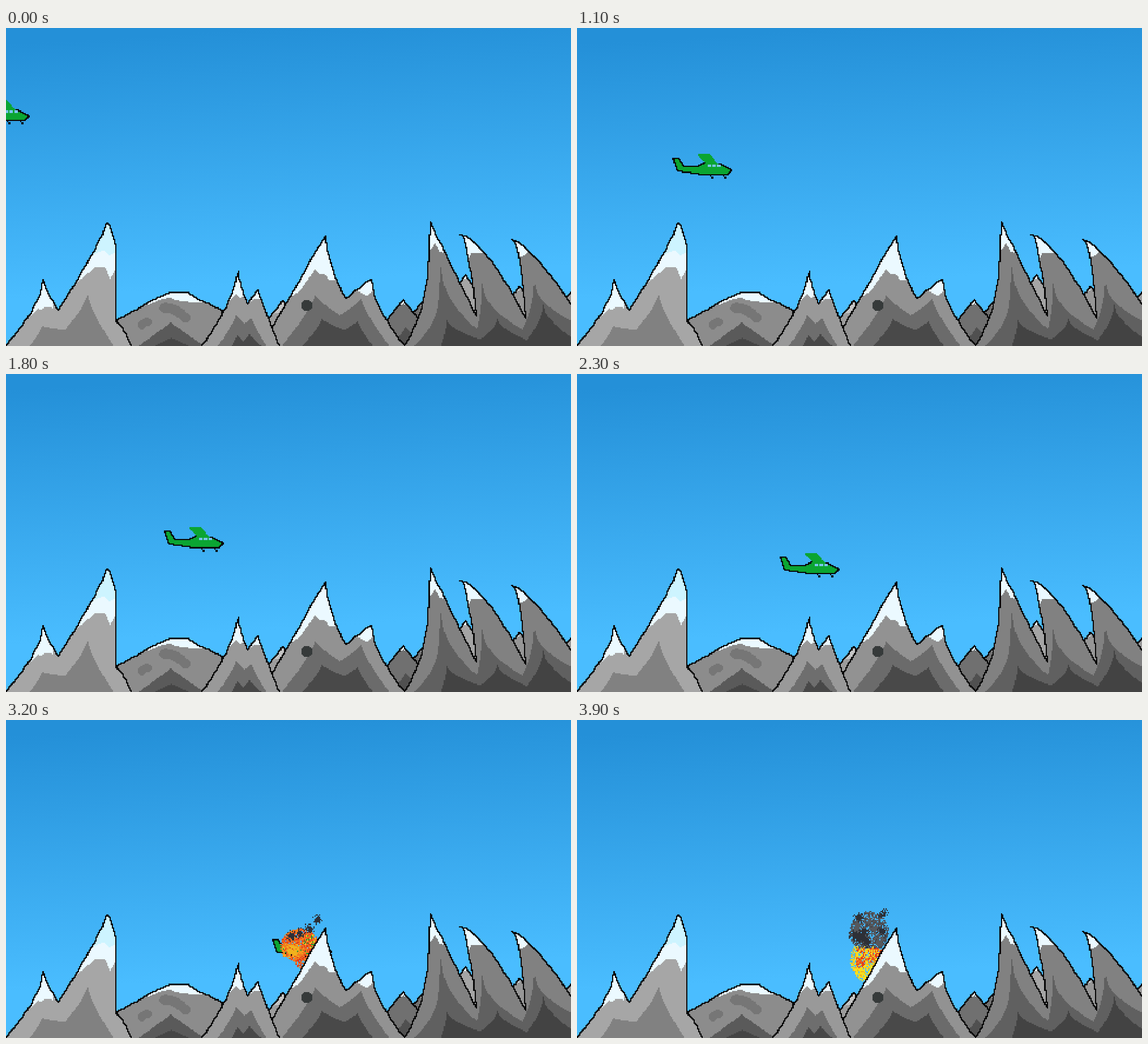
An HTML page with a canvas that plays this animation: 998x561 px, repeating every 4000 ms.

```html
<!DOCTYPE html>
<html lang="en">
<head>
<meta charset="utf-8">
<title>Mountain flight</title>
<style>
html, body { margin: 0; width: 100%; height: 100%; overflow: hidden; background: #48b9fb; }
canvas { display: block; width: 998px; height: 561px; }
</style>
</head>
<body>
<canvas id="stage" width="998" height="561"></canvas>
<script>
// Shapes are given in stage pixels and rasterised onto a coarse 480 x 270 grid.
const COLS = 480, ROWS = 270, CELL = 998 / COLS;
const INK = '#080808', SNOW = '#ebf9ff', ICE = '#cdf4ff', GREEN = '#0ba532';
const RED = '#e23e1c', ORANGE = '#f07a1f', AMBER = '#f0b21d', YELLOW = '#f6df20';
const SOOT = '#2d3037', SMOKE = '#55585d', ASH = '#42454b';
const FLOOR = 580, CEILING = 300;

function grid(w = COLS, h = ROWS) {
  const canvas = document.createElement('canvas');
  canvas.width = w;
  canvas.height = h;
  return canvas.getContext('2d');
}

const toCells = points => points.map(([x, y]) => [x / CELL, y / CELL]);

function fillShape(g, points, color) {
  const cells = toCells(points);
  g.fillStyle = color;
  for (let row = 0; row < g.canvas.height; row++) {
    const y = row + 0.5, hits = [];
    cells.forEach(([x1, y1], i) => {
      const [x2, y2] = cells[(i + 1) % cells.length];
      if ((y1 <= y) !== (y2 <= y)) hits.push(x1 + (y - y1) / (y2 - y1) * (x2 - x1));
    });
    hits.sort((a, b) => a - b);
    for (let i = 0; i + 1 < hits.length; i += 2) {
      const left = Math.round(hits[i]);
      g.fillRect(left, row, Math.round(hits[i + 1]) - left, 1);
    }
  }
}

// Steps move along one axis at a time, so diagonals have no gaps at the corners.
function strokeShape(g, points) {
  const cells = toCells(points).map(p => p.map(Math.floor));
  g.fillStyle = INK;
  for (let i = 1; i < cells.length; i++) {
    let [x, y] = cells[i - 1];
    const [x2, y2] = cells[i];
    const dx = Math.abs(x2 - x), dy = Math.abs(y2 - y);
    const sx = Math.sign(x2 - x), sy = Math.sign(y2 - y);
    g.fillRect(x, y, 1, 1);
    for (let a = 0, b = 0; a < dx || b < dy;) {
      if (b >= dy || (a < dx && (a + 0.5) * dy < (b + 0.5) * dx)) { x += sx; a++; }
      else { y += sy; b++; }
      g.fillRect(x, y, 1, 1);
    }
  }
}

// Joins peaks and valleys [x, y, bend]; a bend below 1 makes the slope steepest at the top.
function ridge(keys, defaultBend = 1) {
  const points = [];
  for (let i = 0; i + 1 < keys.length; i++) {
    const [x1, y1, bend = defaultBend] = keys[i], [x2, y2] = keys[i + 1];
    for (let k = 0; k < 12; k++) {
      const t = k / 12;
      const drop = y1 < y2 ? t ** bend : 1 - (1 - t) ** bend;
      points.push([x1 + (x2 - x1) * t, y1 + (y2 - y1) * drop]);
    }
  }
  points.push(keys[keys.length - 1].slice(0, 2));
  return points;
}

const closeAt = (line, y) => [...line, [line[line.length - 1][0], y], [line[0][0], y]];
const shade = (color, keys, bend) => [color, closeAt(ridge(keys, bend), FLOOR)];
const cap = (color, ...keys) => [color, closeAt(ridge(keys), CEILING)];

function ellipse(cx, cy, rx, ry = rx) {
  return Array.from({ length: 20 }, (_, i) => {
    const a = i * Math.PI / 10;
    return [cx + rx * Math.cos(a), cy + ry * Math.sin(a)];
  });
}

// Patches stay inside the silhouette below the ridge line.
function mountain(target, line, color, patches) {
  const g = grid();
  fillShape(g, closeAt(line, FLOOR), color);
  g.globalCompositeOperation = 'source-atop';
  for (const [tone, points] of patches) fillShape(g, points, tone);
  g.globalCompositeOperation = 'source-over';
  strokeShape(g, line);
  target.drawImage(g.canvas, 0, 0);
}

// A small far peak with a light cap.
function farPeak(g, x, y, reach, color, capColor, depth) {
  const line = ridge([[x - reach, y + reach * 1.2], [x, y], [x + reach, y + reach * 1.2]], 0.9);
  mountain(g, line, color, [cap(capColor, [x - reach, y + depth], [x, y + depth * 0.7], [x + reach, y + depth])]);
}

function makeBackdrop() {
  const g = grid();
  const sky = g.createLinearGradient(COLS / 2 - 8, 0, COLS / 2 + 8, ROWS);
  sky.addColorStop(0, '#2490d8');
  sky.addColorStop(0.8, '#4abdff');
  g.fillStyle = sky;
  g.fillRect(0, 0, COLS, ROWS);

  const blots = [ellipse(240, 524, 8), ellipse(249, 519, 9, 7)];
  for (let i = 0; i < 5; i++) blots.push(ellipse(281 + i * 9, 494 + i * i * 1.1, 10, 9));
  mountain(g, ridge([[190, 520], [258, 481], [292, 466], [322, 466], [335, 476], [400, 507]]), '#8c8c8c', [
    cap(SNOW, [250, 489], [275, 479], [289, 476], [303, 481], [334, 485], [356, 485]),
    ...blots.map(blot => ['#767676', blot]),
    shade('#5a5a5a', [[228, 566], [291, 520], [356, 566]]),
    shade('#454545', [[252, 566], [292, 547], [335, 566]])
  ]);
  farPeak(g, 489, 482, 30, '#9c9c9c', '#c5c5c5', 26);
  farPeak(g, 735, 484, 22, '#707070', '#bcbcbc', 9);
  farPeak(g, 702, 479, 34, '#707070', SNOW, 12);
  fillShape(g, closeAt(ridge([[680, 566], [706, 528], [740, 566]]), FLOOR), '#505050');
  farPeak(g, 812, 436, 25, '#a5a5a5', SNOW, 10);
  farPeak(g, 908, 456, 18, '#969696', SNOW, 9);
  farPeak(g, 1002, 461, 22, '#9b9b9b', SNOW, 6);
  return g.canvas;
}

function makeForeground() {
  const g = grid();
  mountain(g, ridge([[460, 547], [564, 366, 0.62], [600, 478], [645, 443, 0.62], [704, 561]]), '#929292', [
    cap(SNOW, [503, 475], [520, 463], [546, 426], [555, 435], [563, 434], [570, 444], [584, 444]),
    cap(SNOW, [619, 463], [638, 473], [650, 462]),
    shade('#6b6b6b', [[483, 566], [546, 472], [590, 507], [627, 478], [681, 566]], 0.8),
    shade('#494949', [[519, 566], [558, 514], [598, 533], [621, 517], [652, 566]], 0.8),
    ['#363a3a', ellipse(531, 490, 10)]
  ]);
  mountain(g, ridge([[347, 561, 0.7], [410, 430, 0.72], [427, 487], [445, 462, 0.9], [483, 561]]), '#999999', [
    cap(SNOW, [393, 482], [407, 470], [413, 477], [422, 471]),
    cap(SNOW, [432, 485], [438, 477], [450, 479]),
    shade('#6e6e6e', [[371, 566], [407, 507], [421, 522], [433, 512], [464, 566]], 0.85),
    shade('#484848', [[395, 566], [408, 541], [420, 553], [430, 538], [458, 566]], 0.7)
  ]);
  mountain(g, ridge([[0, 560, 0.62], [66, 443, 0.75], [92, 498, 0.85], [178, 344], [184, 350], [195, 386],
    [195, 519], [205, 527], [222, 561]]), '#a6a6a6', [
    cap(SNOW, [43, 510], [56, 495], [62, 498], [67, 493], [84, 494]),
    cap(SNOW, [127, 448], [158, 422], [175, 423], [184, 443], [198, 420]),
    cap(ICE, [145, 411], [154, 400], [172, 392], [182, 402], [198, 394]),
    shade('#818181', [[37, 566], [64, 526], [104, 533], [144, 471], [194, 566]], 0.75)
  ]);
  mountain(g, ridge([[704, 561, 0.34], [749, 343], [831, 509, 1.8], [802, 364, 1.55], [918, 513, 2.4],
    [894, 374, 1.4], [1000, 490]]), '#818181', [
    cap(SNOW, [744, 397], [758, 381], [766, 394], [779, 399]),
    cap(SNOW, [797, 404], [816, 409], [822, 397], [845, 396]),
    cap(SNOW, [885, 402], [911, 404], [925, 394]),
    shade('#606060', [[715, 566, 0.3], [768, 420], [832, 532], [841, 451], [912, 532], [933, 448], [1000, 518]], 0.5),
    shade('#434343', [[767, 566], [778, 515], [838, 550], [868, 513], [920, 551], [949, 489], [1000, 547]], 0.6)
  ]);
  return g.canvas;
}

function makePlane() {
  const g = grid(52, 22);
  const box = (color, x, y, w, h) => { g.fillStyle = color; g.fillRect(x, y, w, h); };
  const hull = [[1, 8], [11, 8], [20, 22], [44, 22], [57, 16], [84, 18], [104, 29], [96, 36], [55, 36], [9, 30]];
  fillShape(g, hull, GREEN);
  strokeShape(g, [...hull, hull[0]]);
  fillShape(g, [[44, 0], [65, 0], [82, 18], [60, 18]], GREEN);
  for (let i = 0; i < 3; i++) box('#78c5ee', 30 + i * 4, 9, 3, 2);
  for (const x of [32, 43]) {
    box(INK, x, 18, 1, 1);
    box(INK, x + 1, 19, 2, 2);
  }
  return g.canvas;
}

function randomizer(seed) {
  let s = seed * 7919 + 17;
  return () => {
    s = s + 0x6D2B79F5 | 0;
    let t = Math.imul(s ^ s >>> 15, 1 | s);
    t = t + Math.imul(t ^ t >>> 7, 61 | t) ^ t;
    return ((t ^ t >>> 14) >>> 0) / 4294967296;
  };
}

function spray(g, rnd, cx, cy, rx, ry, count, colors, top = 0, bottom = FLOOR) {
  for (let i = 0; i < count; i++) {
    const a = rnd() * Math.PI * 2, r = Math.sqrt(rnd());
    const x = cx + Math.cos(a) * r * rx, y = cy + Math.sin(a) * r * ry;
    g.fillStyle = colors[Math.floor(rnd() * colors.length)];
    if (y >= top && y < bottom) g.fillRect(Math.floor(x / CELL), Math.floor(y / CELL), 1, 1);
  }
}

function puff(g, rnd, x, y, color) {
  spray(g, rnd, x, y, 10, 10, 24, [color]);
  spray(g, rnd, x, y, 5, 5, 40, [color]);
}

function fireball(g, step) {
  const size = Math.min(1, (step - 27) / 4), rnd = randomizer(step);
  const burst = (x, y, rx, ry, count, colors) =>
    spray(g, rnd, x, y, rx * size, ry * size, count * size, colors);
  burst(519, 398, 33, 29, 1500, [RED, ORANGE, ORANGE]);
  burst(521, 424, 11, 14, 120, [ORANGE, RED]);
  burst(506, 408, 21, 14, 190, [AMBER, ORANGE]);
  burst(509, 406, 11, 9, 130, [AMBER]);
  burst(537, 391, 12, 12, 22, [GREEN, YELLOW]);
  for (let i = 0; i < 4; i++) puff(g, rnd, 503 + i * 16, 380 - i * i * 3 + (32 - step) * 4, SOOT);
}

function burning(g, step) {
  const rise = Math.min(1, (step - 32) / 3), flame = randomizer(step), smoke = randomizer(5);
  spray(g, flame, 512, 424, 28, 38, 1100, [YELLOW, YELLOW, YELLOW, AMBER], 400);
  for (let i = 0; i < 7; i++) {
    spray(g, flame, 494 + flame() * 34, 404 + flame() * 34, 8, 7, 22, [RED, ORANGE]);
  }
  spray(g, flame, 526, 410, 12, 10, 90, [RED, ORANGE]);
  spray(g, smoke, 516, 404 - 30 * rise, 34, 36, 1100 * rise, [SMOKE, SMOKE, ASH], 0, 403);
  for (let i = 0; i < 14; i++) {
    const height = smoke() * 56, drift = 26 + height * 0.2;
    puff(g, smoke, 515 - height * 0.15 + (smoke() * 2 - 1) * drift, 396 - height * rise, i % 4 ? SOOT : SMOKE);
  }
}

// step, left edge, top edge
const ROUTE = [[0, -65, 127], [6, 89, 187], [18, 278, 271], [30, 470, 381], [40, 470, 381]];
const IMPACT = 28, BURN = 34;

function planeAt(step) {
  const i = ROUTE.findIndex(stop => stop[0] > step);
  const [s1, x1, y1] = ROUTE[i - 1], [s2, x2, y2] = ROUTE[i];
  const k = (step - s1) / (s2 - s1);
  return [x1 + (x2 - x1) * k, y1 + (y2 - y1) * k];
}

const backdrop = makeBackdrop(), foreground = makeForeground(), plane = makePlane();
const scene = grid();
const stage = document.getElementById('stage').getContext('2d');
stage.imageSmoothingEnabled = false;

function draw(step) {
  scene.drawImage(backdrop, 0, 0);
  if (step < BURN) {
    const [x, y] = planeAt(step);
    scene.drawImage(plane, Math.round(x / CELL), Math.round(y / CELL));
    if (step >= IMPACT) fireball(scene, step);
  } else {
    burning(scene, step);
  }
  scene.drawImage(foreground, 0, 0);
  stage.drawImage(scene.canvas, 0, 0, 998, 561);
}

const start = performance.now();
let shown = -1;
function tick() {
  const step = Math.floor(Math.max(0, performance.now() - start) / 100) % 40;
  if (step !== shown) draw(shown = step);
  requestAnimationFrame(tick);
}
tick();
</script>
</body>
</html>
```
